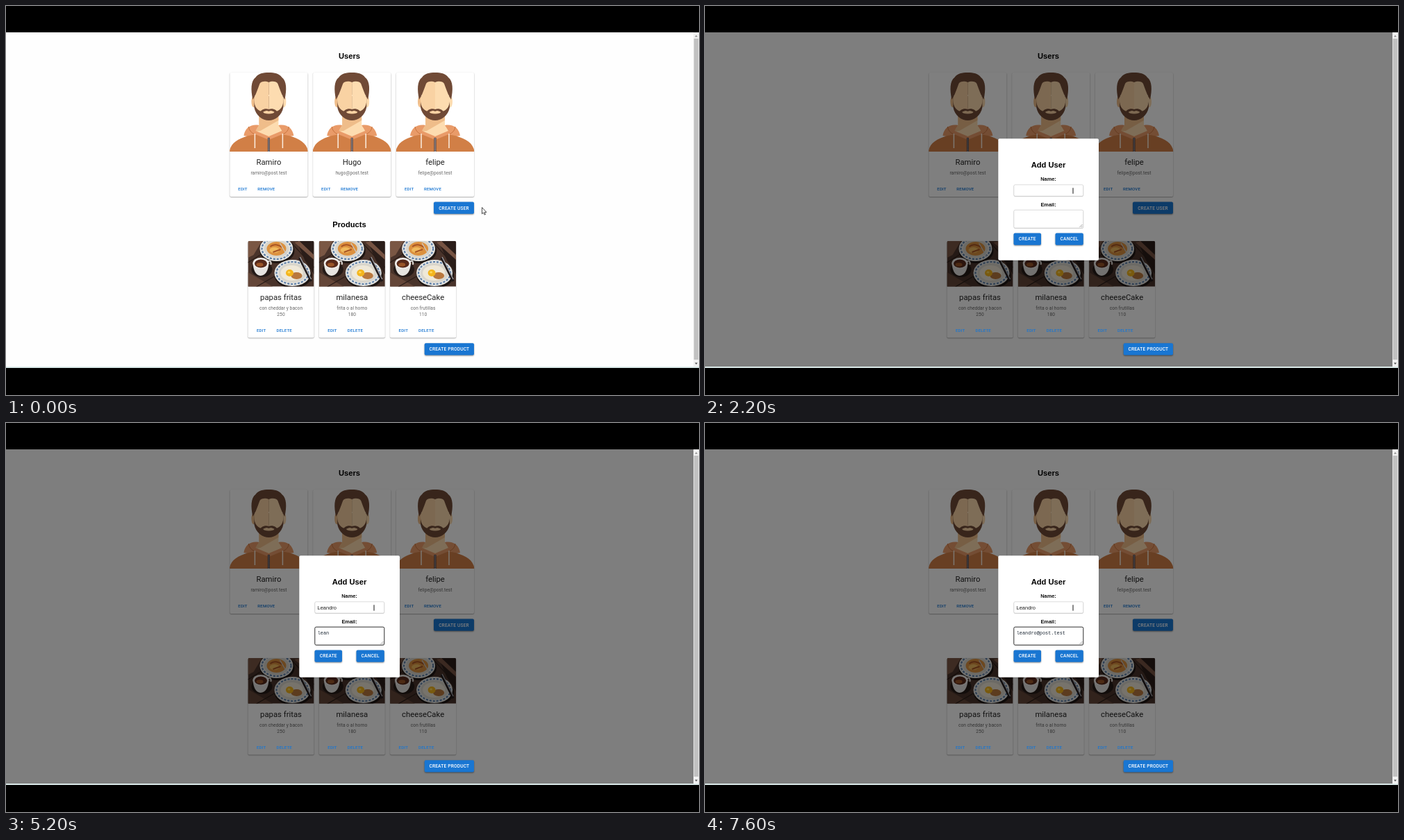
Recreate the animation shown at these times as an HTML page with a canvas. Size 998 by 561 pixels, loop 8 s.

```html
<!DOCTYPE html>
<html lang="es">
<head>
<meta charset="utf-8">
<title>Users and products</title>
<style>
html, body { margin: 0; width: 100%; height: 100%; overflow: hidden; background: #000; }
canvas { display: block; }
</style>
</head>
<body>
<canvas id="stage" width="998" height="561"></canvas>
<script>
const ctx = document.getElementById('stage').getContext('2d');
const LOOP = 8000, STEP = 200;
const SANS = '"Liberation Sans", Arial, sans-serif';
const ROBOTO = 'Roboto, sans-serif';
const MONO = '"Liberation Mono", monospace';
const BLUE = '#1976d2', HOVER = '#1565c0', INK = 'rgba(0,0,0,.87)', SOFT = 'rgba(0,0,0,.6)';

const users = [
  ['Ramiro', 'ramiro@post.test'],
  ['Hugo', 'hugo@post.test'],
  ['felipe', 'felipe@post.test']
];
const products = [
  ['papas fritas', 'con cheddar y bacon', '250'],
  ['milanesa', 'frita o al horno', '180'],
  ['cheeseCake', 'con frutillas', '110']
];
const newName = 'Leandro', newMail = 'leandro@post.test';

// [time, characters typed]
const nameKeys = [[3200, 1], [3400, 3], [3600, 4], [3800, 6], [4000, 7]];
const mailKeys = [[4600, 1], [4800, 3], [5200, 4], [5400, 5], [5600, 6], [5800, 7],
  [6000, 8], [6400, 9], [6600, 10], [6800, 12], [7200, 13], [7400, 15], [7600, 17]];
// [time, shape, x, y]
const pointer = [[0, 'arrow', 685.5, 290.5], [1000, 'hand', 665, 291], [1200, 'hand', 656, 291],
  [1600, 'arrow', 656, 291], [1800, 'arrow', 612, 281], [2000, 'beam', 544, 268], [2200, 'beam', 530, 266.5]];

function last(keys, t) {
  let hit = null;
  for (const k of keys) if (k[0] <= t) hit = k;
  return hit;
}
const typed = (text, keys, t) => text.slice(0, (last(keys, t) || [0, 0])[1]);

function rect(x, y, w, h, color) {
  ctx.fillStyle = color;
  ctx.fillRect(x, y, w, h);
}

function shape(d, color) {
  ctx.fillStyle = color;
  ctx.fill(new Path2D(d));
}

function line(d, color, width) {
  ctx.strokeStyle = color;
  ctx.lineWidth = width;
  ctx.stroke(new Path2D(d));
}

function oval(x, y, rx, ry, color, turn = 0) {
  ctx.fillStyle = color;
  ctx.beginPath();
  ctx.ellipse(x, y, rx, ry, turn, 0, Math.PI * 2);
  ctx.fill();
}

function label(text, x, y, font, color, align = 'center', spacing = 0) {
  ctx.font = font;
  ctx.fillStyle = color;
  ctx.textAlign = align;
  ctx.letterSpacing = spacing + 'px';
  ctx.fillText(text, x, y);
}

function panel(x, y, w, h, r, color, shadow, blur, drop) {
  ctx.save();
  ctx.shadowColor = shadow;
  ctx.shadowBlur = blur;
  ctx.shadowOffsetY = drop;
  ctx.fillStyle = color;
  ctx.beginPath();
  ctx.roundRect(x, y, w, h, r);
  ctx.fill();
  ctx.restore();
}

function button(text, x, y, w, color = BLUE) {
  panel(x, y, w, 17.3, 2, color, 'rgba(0,0,0,.45)', 2, 1);
  label(text, x + w / 2, y + 11, '500 6.6px ' + ROBOTO, '#fff', 'center', 0.19);
}

function link(text, x, y) {
  label(text, x, y, '500 6.1px ' + ROBOTO, BLUE, 'left', 0.17);
}

const heading = (text, y) => label(text, 494.5, y, 'bold 11.2px ' + SANS, '#000');

function card(x, y, w, h) {
  panel(x, y, w, h, 2, '#fff', 'rgba(0,0,0,.4)', 1.5, 0.8);
}

function avatar(x, y) {
  ctx.save();
  ctx.beginPath();
  ctx.rect(x - 56.2, y - 1, 112.4, 115);
  ctx.clip();
  ctx.translate(x, y);
  // hoodie and neck
  shape('M-36 91C-34 79 -25 74 -14 76L0 80L14 76C25 74 34 79 36 91L0 98Z', '#e99b69');
  shape('M-57 115C-55 102 -46 96 -29 91Q-15 87 0 93Q15 87 29 91C46 96 55 102 57 115Z', '#d17f46');
  shape('M-14 55H14V76L20 85L0 94L-20 85L-14 76Z', '#fddcb0');
  shape('M-14 55H14V69L-12 84L-20 85L-14 76Z', '#efbd8a');
  shape('M-15 76L-24 79L-22 88L0 97L22 88L24 79L15 76L19 84L0 92L-19 84Z', '#e99b69');
  line('M-29 78Q-28 86 -20 89M29 78Q28 86 20 89', '#c8743f', 1);
  line('M-20 88V109M20 88V109', '#fbeee0', 1.5);
  rect(-1.6, 94, 3.2, 21, '#54484a');
  for (let i = 95; i < 114; i += 2) rect(-1, i, 2, 0.8, '#b9aeb0');
  // head
  oval(-22, 42, 3, 8, '#efbd8a');
  oval(22, 42, 3, 8, '#fddcb0');
  shape('M-23 39C-26 25 -26 12 -19 7C-15 1 -8 0 0 0C8 0 15 1 19 7C26 12 26 25 23 39L19 32H-19Z', '#704a36');
  shape('M-21 34L-21 50C-19 62 -9 69 0 69C9 69 19 62 21 50L21 34Z', '#704a36');
  shape('M0 14C-4 12 -11 12 -13 16C-16 24 -18 30 -21 36C-22 46 -18 55 -10 56L0 56Z', '#f9d2a3');
  shape('M0 14C4 12 11 12 13 16C16 24 18 30 21 36C22 46 18 55 10 56L0 56Z', '#fddcb0');
  shape('M-13 59C-12 54 -6 51 0 53C6 51 12 54 13 59L9 63H-9Z', '#704a36');
  oval(0, 57, 8, 2.6, '#f9d2a3');
  line('M-8 56Q-4 53 0 55Q4 53 8 56', '#704a36', 1.5);
  ctx.restore();
}

function plate(x, y, rx, ry) {
  oval(x + 1, y + 3, rx + 1, ry, '#1d1512');
  oval(x, y, rx, ry, '#e3e4e2');
  ctx.save();
  ctx.setLineDash([3, 2]);
  ctx.strokeStyle = '#5b7da6';
  ctx.lineWidth = 2.2;
  ctx.beginPath();
  ctx.ellipse(x, y, rx - 3, ry - 3, 0, 0, Math.PI * 2);
  ctx.stroke();
  ctx.restore();
  oval(x, y, rx - 6, ry - 5, '#d9d5cb');
}

function breakfast(x, y) {
  ctx.save();
  ctx.beginPath();
  ctx.roundRect(x, y, 95, 65.5, [2, 2, 0, 0]);
  ctx.clip();
  ctx.translate(x, y);
  rect(0, 0, 95, 66, '#49332a');
  shape('M0 0H20L8 20L0 24Z', '#7a5744');
  shape('M0 45L36 66H0Z', '#644638');
  shape('M70 0H95V48L82 28Z', '#2a1d19');
  shape('M74 0L95 20V27L67 2Z', '#765342');
  line('M0 31L30 12M12 66L50 44M62 2L95 38', '#291c17', 1.2);
  plate(41, 11, 24, 18);
  oval(41, 11, 14, 10, '#dc913f');
  oval(38, 13, 7, 4, '#efb95d');
  line('M32 8Q39 2 49 9M36 16L47 12', '#a95424', 2);
  line('M46 3L57 22', '#c9cbd0', 1.2);
  plate(64, 46, 26, 19);
  oval(63, 46, 16, 11, '#efe8d8');
  oval(70, 50, 8, 5, '#b9783e');
  oval(60, 46, 5.5, 5, '#f4b51d');
  oval(59, 45, 2, 1.5, '#ffd958');
  line('M74 24L91 58', '#20191a', 3.4);
  line('M75 23L91 55', '#a8aab0', 1.2);
  oval(20, 41, 15, 11, '#241a17');
  line('M27 30Q34 26 33 34', '#dddad6', 2);
  shape('M7 31Q8 49 18 50Q29 49 30 31Z', '#e6e4e1');
  oval(18.5, 32, 11.5, 8, '#f1eeeb');
  oval(18.5, 32.5, 9, 6, '#57291a');
  oval(17, 34, 5, 2.8, '#9a5528');
  ctx.restore();
}

function productLinks() {
  products.forEach((p, i) => {
    const x = 348.5 + i * 102.3;
    link('EDIT', x + 12.5, 469.8);
    link('DELETE', x + 41, 469.8);
  });
}

function page(hover) {
  rect(0, 38, 990, 482, '#fefefe');
  heading('Users', 76.2);
  users.forEach(([name, mail], i) => {
    const x = 322.3 + i * 119.8, mid = x + 56.1;
    card(x, 96, 112.2, 179);
    avatar(mid, 96);
    label(name, mid, 229, '11.3px ' + ROBOTO, INK);
    label(mail, mid, 243, '6.6px ' + ROBOTO, SOFT, 'center', 0.07);
    link('EDIT', x + 12, 266.3);
    link('REMOVE', x + 40, 266.3);
  });
  button('CREATE USER', 616, 282.5, 58, hover);
  heading('Products', 319.2);
  products.forEach(([name, info, price], i) => {
    const x = 348.5 + i * 102.3, mid = x + 47.5;
    card(x, 339, 95, 139.5);
    breakfast(x, 339);
    label(name, mid, 424, '11.3px ' + ROBOTO, INK);
    label(info, mid, 438, '6.6px ' + ROBOTO, SOFT, 'center', 0.07);
    label(price, mid, 447.3, '6.6px ' + ROBOTO, SOFT, 'center', 0.07);
  });
}

function field(y, h, focused) {
  panel(444.8, y, 100, h, 2, '#fff', 'rgba(0,0,0,.3)', 1, 0.5);
  ctx.strokeStyle = focused ? '#333' : '#c8c8c8';
  ctx.lineWidth = focused ? 1 : 0.6;
  ctx.beginPath();
  ctx.roundRect(444.8, y, 100, h, 2);
  ctx.stroke();
}

const caret = y => rect(448.5, y, 1, 9, '#222');

function dialog(t) {
  const inName = t >= 2400 && t < 4200, inMail = t >= 4200;
  panel(422.3, 191.3, 144.7, 175.5, 2, '#fff', 'rgba(0,0,0,.2)', 2, 0.5);
  heading('Add User', 233.2);
  label('Name:', 494.5, 252.2, 'bold 7.4px ' + SANS, '#111');
  label('Email:', 494.5, 288.7, 'bold 7.4px ' + SANS, '#111');
  field(257.8, 16.4, inName);
  field(294.2, 26, inMail);
  line('M539.5 319L543.5 315M542 319L543.5 317.5', '#777', 0.7);
  label(typed(newName, nameKeys, t), 448.5, 268.5, '7.5px ' + SANS, '#222', 'left');
  label(typed(newMail, mailKeys, t), 448.7, 304.8, '6.9px ' + MONO, '#1c2733', 'left');
  if (t >= 2400 && t < 2800) caret(261);
  if (inMail && t < 4600) caret(298);
  button('CREATE', 444.5, 327.4, 39.5);
  button('CANCEL', 504.5, 327.4, 40.3);
}

function scrollbar() {
  rect(990, 38, 8, 482, '#f1f1f1');
  rect(990.7, 47, 6.4, 463, '#c1c1c1');
  shape('M992 44.5L994 42L996 44.5Z', '#8a8a8a');
  shape('M992 514.5L994 517L996 514.5Z', '#505050');
  rect(0, 520, 998, 2, '#dcebea');
}

const cursors = {
  arrow: 'M0 0V9.3L2.1 7.4L3.6 10.6L5 10L3.6 6.9H6.4Z',
  hand: 'M0 .6Q.8 -.4 1.5 .6V4L5 4.8Q6.2 5.1 6 6.5L5.2 9V11H.6V9.6L-2 6.4Q-1.6 5 -.2 6.4Z'
};

function drawPointer(t) {
  const [, kind, x, y] = last(pointer, t);
  ctx.save();
  ctx.translate(x, y);
  if (kind === 'beam') {
    rect(-0.5, -4.2, 1, 8.4, '#111');
  } else {
    shape(cursors[kind], '#fff');
    line(cursors[kind], '#222', 0.8);
  }
  ctx.restore();
}

function draw(t) {
  rect(0, 0, 998, 561, '#000');
  page(t < 1000 ? BLUE : t < 1200 ? '#176dc9' : t < 2000 ? HOVER : BLUE);
  if (t >= 1600) rect(0, 38, 990, 482, 'rgba(0,0,0,.5)');
  productLinks();
  button('CREATE PRODUCT', 602.7, 486.3, 71.3);
  scrollbar();
  if (t >= 1600) dialog(t);
  drawPointer(t);
}

function frame() {
  const t = performance.now() % LOOP;
  draw(Math.floor(t / STEP) * STEP);
  requestAnimationFrame(frame);
}
frame();
</script>
</body>
</html>
```
